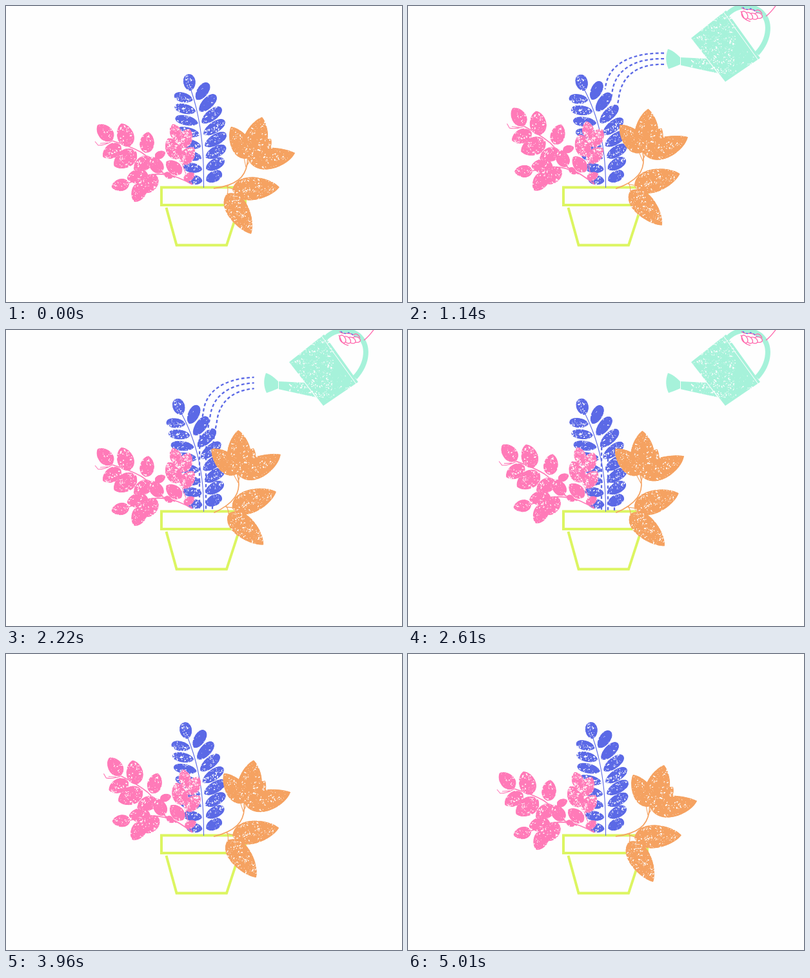
Recreate the animation shown at these times as an HTML page with a canvas. Size 614 by 461 pixels, loop 5.04 s.

```html
<!DOCTYPE html>
<html lang="en">
<head>
<meta charset="utf-8">
<title>Watering a potted plant</title>
<style>
html, body { margin: 0; width: 100%; height: 100%; overflow: hidden; background: #fefefe; }
canvas { display: block; }
</style>
</head>
<body>
<canvas id="stage" width="614" height="461"></canvas>
<script>
const LOOP = 5040, REST = 5010, RES = 2, PAPER = '#fefefe';
const BLUE = '#5b69e6', PINK = '#ff7ab8', ORANGE = '#f5a261', MINT = '#a6f2da', LIME = '#dcf561';
const ctx = document.getElementById('stage').getContext('2d');
const RAD = Math.PI / 180;

let seed = 7;
function rnd() {
  seed = (seed * 1664525 + 1013904223) >>> 0;
  return seed / 4294967296;
}

const times = (n, f) => Array.from({ length: n }, (_, i) => f(i));

function layer(w, h, draw) {
  const c = document.createElement('canvas');
  c.width = Math.ceil(w * RES);
  c.height = Math.ceil(h * RES);
  const g = c.getContext('2d');
  g.scale(RES, RES);
  draw(g);
  return c;
}

// Clustered paper-coloured flecks, only on what is already drawn.
function wear(g, x, y, w, h, density) {
  const p = rnd() * 9, q = rnd() * 9;
  g.globalCompositeOperation = 'source-atop';
  g.fillStyle = PAPER;
  for (let i = w * h * density; i > 0; i--) {
    const px = x + rnd() * w, py = y + rnd() * h;
    const clump = Math.sin(px * 0.31 + p + Math.sin(py * 0.4)) + Math.sin(py * 0.37 + q);
    if (clump < rnd() * 2.4 - 1.4) continue;
    const r = 0.3 + rnd() ** 3 * 0.9;
    g.beginPath();
    g.ellipse(px, py, r * (0.7 + rnd()), r * 0.75, rnd() * 3, 0, 7);
    g.fill();
  }
  g.globalCompositeOperation = 'source-over';
}

// A leaf grows from x, y; taper 1 is a round end, less is a sharper tip.
function leaf(color, taper, x, y, deg, len, w, density, bend = 0) {
  const mid = w / 2 + Math.abs(bend) + 4, k = w / 2 / (0.432 + 0.288 * taper);
  const near = len * 0.12, far = len * (0.6 + 0.4 * taper);
  const img = layer(len + 8, mid * 2, g => {
    g.translate(4, mid);
    g.fillStyle = color;
    g.beginPath();
    g.moveTo(0, 0);
    g.bezierCurveTo(near, bend - k, far, bend - k * taper, len, 0);
    g.bezierCurveTo(far, bend + k * taper, near, bend + k, 0, 0);
    g.fill();
    wear(g, 0, -mid, len, mid * 2, density);
  });
  return { x, y, angle: deg * RAD, mid, img };
}

const stemX = y => 306.5 - 20 * ((283 - y) / 153) ** 2.6;

// Eight pairs up the stem under one end leaf.
const blueLeaves = [leaf(BLUE, 1, 286, 132, -97, 26, 18, 0.3)];
times(8, i => {
  const y = 146 + 18 * i, len = 26 + 13 * Math.sin((i + 1.2) * Math.PI / 8.4);
  const lift = 28 + 27 * (1 - i / 7) ** 3;
  blueLeaves.push(
    leaf(BLUE, 1, stemX(y) + 4, y, -lift, len, 16.5, i < 2 ? 0.05 : 0.2),
    leaf(BLUE, 1, stemX(y) - 2, y + 0.5, 195 - i, len - 2, 14.5, 0.22)
  );
});

const pink = (x, y, deg, len, density = 0.15) =>
  leaf(PINK, 0.7, x, y, deg, len, len * 0.67, density);
const pinkLeaves = [
  // long branch: above, below
  times(3, i => pink(165 + 26 * i, 209 + 10 * i, -134 + 25 * i, 33 + 5 * (i % 2))),
  times(3, i => pink(178 + 24 * i, 217 + 10 * i, 147, 33 + 8 * (i % 2))),
  // low branch: along, below
  times(2, i => pink(220 - 29 * i, 262 + 14 * i, 168, 33 - 5 * i)),
  times(2, i => pink(231 - 18 * i, 262 + 12 * i, 114, 32 + 2 * i)),
  // near the fork, then the small ones
  times(2, i => pink(242 + 30 * i, 259 + 2 * i, -130 - 11 * i, 30, 0.08)),
  times(2, i => pink(231 + 15 * i, 236 + 24 * i, -28 + 62 * i, 18 - 4 * i, 0.04)),
  // upright sprig: left, right
  times(2, i => pink(268, 209 + 29 * i, -112 - 6 * i, 27 + 9 * i, 0.4)),
  times(2, i => pink(272, 221 + 25 * i, -67 + 13 * i, 32, 0.5)),
  pink(276, 271, -32, 19, 0.2)
].flat();

const orange = (...spec) => leaf(ORANGE, 0.55, ...spec);
const orangeLeaves = [
  orange(376, 237, -119, 56, 31, 0.13),
  orange(384, 239, -50, 42, 24, 0.1),
  orange(379, 238, -74.5, 67.5, 38, 0.12),
  orange(374, 236, -5.5, 74.5, 34, 0.12, 6),
  orange(351, 286, -3, 73, 36, 0.14),
  orange(343, 292, 59.5, 73, 34, 0.17, -1)
];

const can = layer(614, 190, g => {
  g.translate(0, 60);
  g.strokeStyle = g.fillStyle = MINT;
  g.lineWidth = 8;
  g.stroke(new Path2D('M496 12C512-3 532-2 546 8C564 23 561 52 541 74'));
  g.fill(new Path2D('M439 50L493 7L546 81L492 118ZM422 80L463 82L481 105L422 92Z' +
    'M403 67Q411 69 422 80V91Q413 95 404 98Q397 83 403 67Z'));
  wear(g, 439, 7, 70, 100, 0.2);
  wear(g, 450, 70, 90, 45, 0.05);
  g.strokeStyle = g.fillStyle = PAPER;
  g.lineWidth = 1;
  g.stroke(new Path2D('M489 9L543 84M422.5 78V94M461 79L483 108'));
  g.lineWidth = 1.3;
  g.strokeStyle = '#ff69ad';
  times(4, i => {
    g.beginPath();
    g.ellipse(543 - 7 * i, 15 + Math.sin(i * 1.4), 6.5, 4.2, 0.25 + 0.27 * i, 0, 7);
    g.fill();
    g.stroke();
  });
  g.stroke(new Path2D('M517 2C523 9 532 2 538 8C543 4 546 7 549 12M516 8C520 14 518 21 531 24M555 16Q564 9 574-6L592-40'));
  g.strokeStyle = BLUE;
  g.setLineDash([3, 3]);
  g.stroke(new Path2D('M519 2Q526 8 531 4Q537 6 541 10'));
});

// Three jets, each a little lower and further right.
const jets = times(3, i => {
  const x = 306 + 10.3 * i, y = 128 + 8.5 * i, top = 73.5 + 8.7 * i, down = 300 + 10 * i;
  const d = `M397 ${top}C${350 + 5 * i} ${top - 1} ${x + 4} ${y - 40} ${x} ${y}` +
    `Q${down} ${y + 30} ${down} 200V281`;
  const el = document.createElementNS('http://www.w3.org/2000/svg', 'path');
  el.setAttribute('d', d);
  return { path: new Path2D(d), len: el.getTotalLength() };
});

// Quick sine rise to the peak, slow and nearly even return.
function lean(t, peak) {
  if (t < peak) return Math.sin(t / peak * Math.PI / 2);
  return Math.max(0, (REST - t) / (REST - peak)) ** 1.1;
}

function nod(t) {
  const wave = (from, to) => Math.sin(Math.min(1, (t - from) / (to - from)) * Math.PI) ** 2;
  return t < 2220 ? 11 * wave(0, 2220) : 12 * wave(2200, 4930);
}

function ease(t, from, to) {
  const u = Math.min(1, Math.max(0, (t - from) / (to - from)));
  return u * u * (3 - 2 * u);
}

function turned(x, y, angle, draw) {
  ctx.save();
  ctx.translate(x, y);
  ctx.rotate(angle);
  draw();
  ctx.restore();
}

function drawLeaf(l, x = l.x, y = l.y, turn = 0) {
  turned(x, y, l.angle + turn, () =>
    ctx.drawImage(l.img, -4, -l.mid, l.img.width / RES, l.img.height / RES));
}

function line(d, color, width) {
  ctx.strokeStyle = color;
  ctx.lineWidth = width;
  ctx.stroke(new Path2D(d));
}

// The blue stem bends with the square of the height.
function drawBlue(sway) {
  const height = y => (283 - y) / 176;
  const shift = y => sway * height(y) ** 2;
  ctx.strokeStyle = BLUE;
  ctx.lineWidth = 1.1;
  ctx.beginPath();
  for (let y = 283; y >= 130; y -= 3) ctx.lineTo(stemX(y) + shift(y), y);
  ctx.stroke();
  for (const l of blueLeaves) drawLeaf(l, l.x + shift(l.y), l.y, 2 * sway * height(l.y) / 176);
}

function drawSprig(leaves, x, y, deg, color, stem, twigs) {
  turned(x, y, deg * RAD, () => {
    ctx.translate(-x, -y);
    line(stem, color, 1.7);
    line(twigs, color, 1.1);
    leaves.forEach(l => drawLeaf(l));
  });
}

function drawWater(t) {
  const speed = 0.41, period = 8.4;
  const head = speed * (t - 850), tail = Math.max(0, speed * (t - 2190));
  const flow = (t - 1140) * 4 * period / 690;
  ctx.strokeStyle = BLUE;
  ctx.lineWidth = 2.3;
  for (const { path, len } of jets) {
    const end = Math.min(head, len), dash = [];
    let at = 0;
    for (let s = Math.floor((tail - flow) / period) * period + flow; s < end; s += period) {
      const a = Math.max(s, tail), b = Math.min(s + 4.8, end);
      if (b <= a) continue;
      dash.push(0, a - at, b - a, 0);
      at = b;
    }
    if (!dash.length) continue;
    ctx.setLineDash([...dash, 0, len]);
    ctx.stroke(path);
  }
  ctx.setLineDash([]);
}

function drawCan(t) {
  const away = 1 - ease(t, 200, 860) + ease(t, 2610, 3140);
  if (away >= 1) return;
  turned(500 + 18 * away, 60 - 150 * away, 0.2 * away, () =>
    ctx.drawImage(can, -500, -120, 614, 190));
}

function render(t) {
  ctx.fillStyle = PAPER;
  ctx.fillRect(0, 0, 614, 461);
  line('M241 282.5H371V310H241ZM248.5 314L264.5 372.5H342L361 314', LIME, 4);
  drawBlue(-21.5 * -lean(t, 1900) * -1);
  drawWater(t);
  drawSprig(pinkLeaves, 290, 278, nod(t), PINK,
    'M289 278Q268 266 243 260Q232 243 210 228Q192 218 165 210M262 267Q240 258 213 265L190 276',
    'M165 210Q154 217 143 217L138 211M158 213L146 214M289 278Q275 258 272 240L267 207');
  drawSprig(orangeLeaves, 324, 283, -17.8 * lean(t, 2400), ORANGE,
    'M322 284Q347 281 360 271Q371 263 374 246L375 234',
    'M343 279Q345 286 343 294M342 281L356 287M358 272Q368 269 377 275M372 251L369 236M373 248Q379 243 377 234');
  drawCan(t);
}

let start;
function tick(now) {
  if (start === undefined) start = now;
  render((now - start) % LOOP);
  requestAnimationFrame(tick);
}
render(0);
requestAnimationFrame(tick);
</script>
</body>
</html>
```
